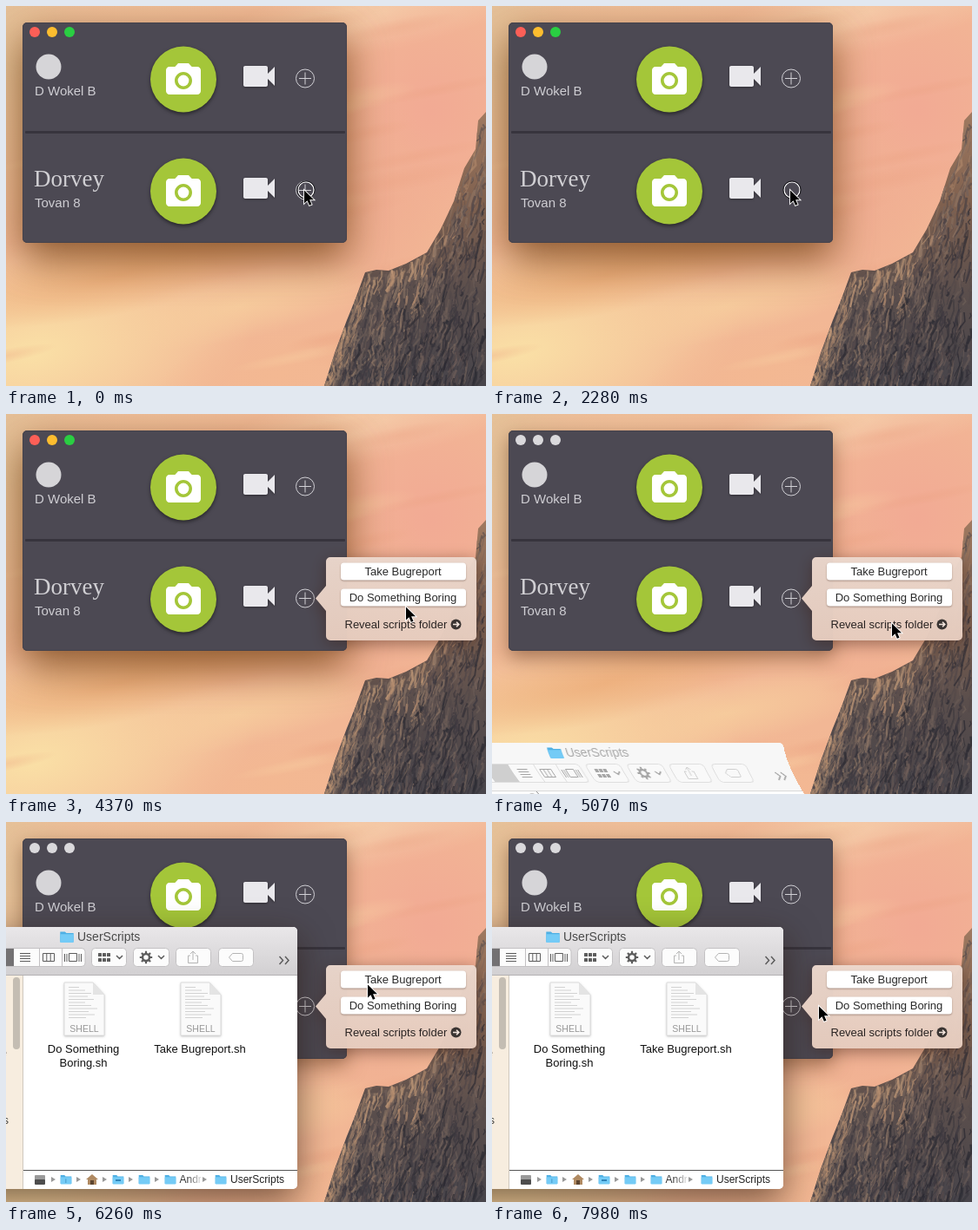
An HTML page with a canvas for the animation above (8 s loop, 552 by 438 pixels).

```html
<!DOCTYPE html>
<html lang="en">
<head>
<meta charset="utf-8">
<title>Device window and scripts folder</title>
<style>
html, body { margin: 0; width: 100%; height: 100%; overflow: hidden; }
canvas { display: block; }
</style>
</head>
<body>
<canvas id="stage" width="552" height="438"></canvas>
<script>
const stage = document.getElementById('stage').getContext('2d');
const LOOP = 8000, SANS = '"Liberation Sans", Arial, sans-serif';
let g = stage;

// ---- drawing helpers, all on the current context g ----
function layer(w, h, draw) {
  const c = document.createElement('canvas');
  c.width = w; c.height = h;
  const old = g;
  g = c.getContext('2d');
  draw();
  g = old;
  return c;
}
function box(x, y, w, h, r, fill, stroke) {
  g.beginPath();
  g.roundRect(x, y, w, h, r);
  if (fill) { g.fillStyle = fill; g.fill(); }
  if (stroke) { g.strokeStyle = stroke; g.lineWidth = 1; g.stroke(); }
}
function disc(x, y, r, fill) {
  g.beginPath();
  g.arc(x, y, r, 0, 7);
  g.fillStyle = fill;
  g.fill();
}
function ring(x, y, r, color, width = 1) {
  g.beginPath();
  g.arc(x, y, r, 0, 7);
  g.strokeStyle = color;
  g.lineWidth = width;
  g.stroke();
}
function stroke(d, color, width = 1) {
  g.strokeStyle = color;
  g.lineWidth = width;
  g.stroke(new Path2D(d));
}
function fill(d, color) {
  g.fillStyle = color;
  g.fill(new Path2D(d));
}
function text(s, x, y, size, color, align = 'left', family = SANS) {
  g.font = size + 'px ' + family;
  g.textAlign = align;
  g.fillStyle = color;
  g.fillText(s, x, y);
}
function shadow(color, blur, dy) {
  g.shadowColor = color;
  g.shadowBlur = blur;
  g.shadowOffsetY = dy;
}
const noShadow = () => shadow('transparent', 0, 0);
function at(x, y, draw, scale = 1) {
  g.save();
  g.translate(x, y);
  g.scale(scale, scale);
  draw();
  g.restore();
}
function vertical(y0, y1, ...colors) {
  const v = g.createLinearGradient(0, y0, 0, y1);
  colors.forEach((c, i) => v.addColorStop(i / (colors.length - 1), c));
  return v;
}
let seed = 7;
const rnd = () => (seed = seed * 16807 % 2147483647) / 2147483647;

// ---- wallpaper ----
const ridge = [[366, 438], [378, 400], [392, 362], [401, 340], [413, 307], [426, 304], [440, 305],
  [460, 297], [484, 284], [500, 257], [515, 225], [527, 187], [540, 165], [543, 132], [552, 122]];
function ridgeY(x) {
  const i = Math.max(1, ridge.findIndex(p => p[0] >= x));
  const [a, b] = [ridge[i - 1], ridge[i]];
  return a[1] + (b[1] - a[1]) * (x - a[0]) / (b[0] - a[0]);
}
function cloud(x, y, rx, ry, rgb, alpha = 1) {
  g.save();
  g.translate(x, y);
  g.rotate(-0.2);
  g.scale(rx, ry);
  const c = g.createRadialGradient(0, 0, 0, 0, 0, 1);
  c.addColorStop(0, `rgba(${rgb},${alpha})`);
  c.addColorStop(0.5, `rgba(${rgb},${alpha * 0.55})`);
  c.addColorStop(1, `rgba(${rgb},0)`);
  g.fillStyle = c;
  g.fillRect(-1, -1, 2, 2);
  g.restore();
}
function rock() {
  g.save();
  g.beginPath();
  ridge.forEach(([x, y]) => g.lineTo(x, y));
  g.lineTo(552, 438);
  g.clip();
  g.fillStyle = vertical(120, 438, '#a07a61', '#80614f', '#5a4e4c', '#47444a');
  g.fillRect(360, 110, 200, 330);
  const tones = ['#2b2a32', '#3c383f', '#54494a', '#73625b', '#8f7766', '#b48c6e', '#c99f7b'];
  for (let i = 0; i < 1500; i++) {
    const x = 366 + rnd() * 186, top = ridgeY(x);
    const depth = rnd() * (445 - top), len = 5 + rnd() * 22;
    const tone = rnd() * 4.4 + 2.6 * Math.exp(-depth / 40) - (x > 470 && depth > 90 ? 0.7 : 0);
    g.globalAlpha = 0.35 + rnd() * 0.4;
    g.beginPath();
    g.moveTo(x, top + depth);
    g.lineTo(x + (rnd() - 0.62) * 7, top + depth + len * 0.5);
    g.lineTo(x - len * (0.1 + rnd() * 0.3), top + depth + len);
    g.strokeStyle = tones[Math.min(6, Math.max(0, tone | 0))];
    g.lineWidth = 0.7 + rnd() * 2.2;
    g.stroke();
  }
  g.restore();
}
const wallpaper = layer(552, 438, () => {
  g.fillStyle = '#f2b795';
  g.fillRect(0, 0, 552, 438);
  cloud(0, 40, 190, 260, '227,194,152');
  cloud(180, 0, 220, 60, '238,190,152');
  cloud(430, 8, 190, 45, '245,207,170');
  cloud(490, 120, 150, 150, '242,170,148');
  cloud(425, 230, 90, 130, '240,174,146');
  cloud(30, 400, 260, 130, '250,224,166');
  cloud(130, 310, 220, 45, '236,172,120', 0.8);
  cloud(270, 345, 170, 40, '247,207,158', 0.8);
  cloud(310, 425, 140, 60, '243,184,146');
  for (let i = 0; i < 26; i++)
    cloud(rnd() * 500, rnd() * 438, 40 + rnd() * 70, 6 + rnd() * 12,
      i % 2 ? '250,214,166' : '234,160,128', 0.3);
  rock();
});

// ---- device window ----
const CAMERA = 'M9 2L7.17 4H4c-1.1 0-2 .9-2 2v12c0 1.1.9 2 2 2h16c1.1 0 2-.9 2-2V6c0-1.1-.9-2-2-2h-3.17L15 2H9z' +
  'm3 15c-2.76 0-5-2.24-5-5s2.24-5 5-5 5 2.24 5 5-2.24 5-5 5z';
const VIDEO = 'M17 10.5V7c0-.55-.45-1-1-1H4c-.55 0-1 .45-1 1v10c0 .55.45 1 1 1h12c.55 0 1-.45 1-1v-3.5l4 4v-11l-4 4z';

function plus(y) {
  ring(344, y, 10.5, '#d2d1d6');
  stroke(`M337 ${y}h14M344 ${y - 7}v14`, '#d2d1d6');
}
function device(dy, name) {
  text(name, 33, dy + 103, 15, '#cfced3');
  shadow('rgba(0,0,0,.5)', 4, 2);
  disc(204, dy + 84.5, 38, '#a4c639');
  noShadow();
  at(180, dy + 62, () => { fill(CAMERA, '#fff'); disc(12, 12, 3.2, '#fff'); }, 2);
  shadow('rgba(0,0,0,.4)', 3, 1);
  at(267, dy + 57, () => fill(VIDEO, '#e9e8ec'), 2);
  noShadow();
}
const deviceWindow = active => layer(552, 438, () => {
  g.drawImage(wallpaper, 0, 0);
  shadow(active ? 'rgba(105,55,10,.75)' : 'rgba(90,50,20,.5)', active ? 46 : 22, active ? 18 : 8);
  box(19, 19, 373, 254, 5, '#4c4953');
  noShadow();
  box(19.5, 19.5, 372, 253, 5, null, '#45424b');
  box(22, 144, 368, 3, 1, '#37343d');
  ['#fc5f57', '#fdbd2f', '#2ace42'].forEach((c, i) =>
    disc(33 + 20 * i, 30, 6, active ? c : '#dad9dc'));
  disc(49, 70, 14.5, '#d6d5d8');
  device(0, 'D Wokel B');
  text('Dorvey', 32, 208, 27, '#d0cfd3', 'left', '"Liberation Serif", Times, serif');
  device(129, 'Tovan 8');
  plus(83.5);
});
const front = deviceWindow(true), back = deviceWindow(false);

// ---- popover ----
function pushButton(y, label) {
  shadow('rgba(80,50,40,.45)', 2, 1);
  box(385, y, 144, 20, 3.5, '#fff');
  noShadow();
  text(label, 456.5, y + 14.5, 13, '#2a2a2a', 'center');
}
function popover(scale, alpha) {
  g.save();
  g.globalAlpha = alpha;
  g.translate(356, 212);
  g.scale(scale, scale);
  g.translate(-356, -212);
  shadow('rgba(60,30,20,.5)', 18, 4);
  fill('M373 165H536a5 5 0 0 1 5 5V256a5 5 0 0 1-5 5H373a5 5 0 0 1-5-5V227L356 212.5 368 198V170a5 5 0 0 1 5-5z',
    vertical(165, 261, 'rgba(237,217,206,.96)', 'rgba(233,207,193,.96)'));
  noShadow();
  pushButton(171.5, 'Take Bugreport');
  pushButton(201.5, 'Do Something Boring');
  text('Reveal scripts folder', 389.5, 246.5, 13, '#2a2423');
  disc(517.5, 242.5, 6, '#3a3432');
  stroke('M514 242.5h6.5M518 239.7l2.8 2.8-2.8 2.8', '#f4e6de', 1.6);
  g.restore();
}

// ---- file window, drawn with spare room on the left for the warp ----
const PAD = 150, TOP = 121, RIGHT = 335, HEIGHT = 302;

function folder(x, y, s = 1) {
  at(x, y, () => {
    fill('M-7 -5.5h5l1.5 1.5h7.5v9.5h-14z', '#4fb0e4');
    box(-7, -3, 14, 9, 1, '#74cbf6');
  }, s);
}
function page(x, label) {
  shadow('rgba(0,0,0,.3)', 3, 1);
  fill(`M${x - 23} 185h33l13 14v47h-46z`, '#fafafa');
  noShadow();
  stroke(`M${x - 23} 185h33l13 14v47h-46z`, '#dcdcdc');
  fill(`M${x + 10} 185v14h13z`, '#e4e4e4');
  for (let i = 0; i < 11; i++)
    stroke(`M${x - 18} ${190.5 + 3.5 * i}h${(i < 3 ? 12 : 18) + i * 7 % 17}`, '#d2d2d2');
  text('SHELL', x, 242, 10.5, '#999', 'center');
  label.forEach((s, i) => text(s, x - 1, 266 + 16 * i, 13, '#111', 'center'));
}
function toolbar(on) {
  const ink = on ? '#5c5c5c' : '#a6a6a6', soft = on ? '#b4b4b4' : '#cfcfcf', edge = on ? '#c3c1c3' : '#dedede';
  const face = on ? '#fcfcfc' : '#f9f9f9';
  folder(70, 132.5, 1.1);
  text('UserScripts', 82, 137, 14, on ? '#4a4a4a' : '#a9a9a9');
  box(-60, 145.5, 151, 21, 4, face, edge);
  fill('M-20 146h29v20h-29z', on ? '#737173' : '#cfcfcf');
  stroke('M38.5 146v20M64.5 146v20', edge);
  [[98, 40], [146, 41], [195, 40], [244, 40]].forEach(([x, w]) => box(x + 0.5, 145.5, w, 21, 4, face, edge));
  stroke('M16 151.5h12M16 154.5h12M16 157.5h12M16 160.5h12', ink);
  stroke('M42.5 151.5h13v9h-13zM46.8 151v9M51.2 151v9', ink);
  stroke('M72.5 151.5h9v9h-9zM67.5 152v9M70 152v9M84 152v9M86.5 152v9', ink);
  for (let i = 0; i < 6; i++) box(106 + i % 3 * 5, 151 + (i / 3 | 0) * 6, 4, 4, 0.5, ink);
  stroke('M127 154l3.5 3.5 3.5-3.5M175 154l3.5 3.5 3.5-3.5', ink, 1.5);
  ring(161, 156, 4, ink, 2.5);
  for (let i = 0; i < 8; i++)
    at(161, 156, () => { g.rotate(i * Math.PI / 4); box(-1.1, -7.2, 2.2, 3, 0, ink); });
  stroke('M212 154h-2.5v8.500h11v-8.500H218M215 159v-9.500M212 152l3-3 3 3', soft);
  stroke('M260.500 151.500h10q2 0 2 2v5q0 2-2 2h-10l-4-4.500z', soft);
  stroke('M314.500 155l4 4.500-4 4.500M321 155l4 4.500-4 4.500', ink, 1.5);
}
function sidebar(on) {
  box(-PAD, 177, PAD + 19, 247, 0, on ? '#f7eddf' : '#fdfdfd');
  const items = [['All My Files', 218], ['Cloud Drive', 270], ['Toolbox', 297], ['Mix', 322],
    ['Applications', 348], ['Desktop', 374], ['Documents', 400], ['Downloads', 425]];
  for (const [s, y] of items) text(s, -67, y, 13, '#444');
  stroke('M-81.500 388.500h7l3 3v11h-10z', '#777');
  disc(-77, 421, 7.5, '#777');
  stroke('M-77 417v6M-80 421l3 3 3-3', '#fff', 1.5);
  box(8, 179, 8, 83, 4, on ? '#c4bdb3' : '#c4c4c4');
  stroke('M19.500 177v247', on ? '#cfc8be' : '#8a8a8a');
}
function pathBar() {
  stroke('M20 401.500h315', '#555');
  box(33, 407, 12, 6, 1, '#9a9a9a');
  box(33, 412, 12, 6, 1, '#4d4d4d');
  [69, 129, 159, 189, 247].forEach(x => folder(x, 412, 0.9));
  text('i', 69, 416, 8, '#2f84b8', 'center');
  stroke('M126 413h6', '#2f84b8', 2);
  fill('M92 412l7-6 7 6h-2v6h-10v-6z', '#b08a62');
  box(97, 413, 4, 5, 0, '#5d4630');
  [54, 83, 113, 143, 173, 228].forEach(x => fill(`M${x - 2} 409l5 3-5 3z`, '#999'));
  const fade = g.createLinearGradient(208, 0, 224, 0);
  fade.addColorStop(0, '#333');
  fade.addColorStop(1, '#ddd');
  text('Andr', 199.5, 416, 12, fade);
  text('UserScripts', 258, 416, 12, '#222');
}
const fileWindow = on => layer(PAD + RIGHT, HEIGHT, () => {
  g.translate(PAD, -TOP);
  box(-PAD, TOP, PAD + RIGHT, HEIGHT, 5);
  g.clip();
  g.fillStyle = '#fff';
  g.fill();
  box(-PAD, TOP, PAD + RIGHT, 55, 0, on ? vertical(TOP, 176, '#e9e7e9', '#d2d0d2') : '#f7f7f7');
  stroke(`M${-PAD} 176.500H335`, on ? '#b3b1b3' : '#d8d8d8');
  toolbar(on);
  sidebar(on);
  page(90, ['Do Something', 'Boring.sh']);
  page(224, ['Take Bugreport.sh']);
  pathBar();
});
const filesActive = fileWindow(true), filesIdle = fileWindow(false);

// Rows are pulled towards a far point at the lower right.
function genie(t) {
  const pull = 0.0845 * ((5450 - t) / 210) ** 2.5;
  const drop = Math.round(Math.max(0, 5200 - t) * 2);
  const w = PAD + RIGHT;
  for (let y = 0; y < HEIGHT; y++) {
    const f = pull * (y / HEIGHT) ** 1.5;
    g.drawImage(filesIdle, 0, y, w, 1, 1104 * f - PAD * (1 - f), TOP + drop + y, w * (1 - f), 1);
  }
}
function files(t) {
  if (t < 5070) return;
  if (t < 5450) return genie(t);
  shadow('rgba(40,20,10,.6)', 40, 14);
  box(-PAD, TOP, PAD + RIGHT, HEIGHT, 5, '#fff');
  noShadow();
  g.drawImage(filesActive, -PAD, TOP);
}

// ---- pointer: time, x, y ----
const track = [[0, 343, 212], [660, 343, 212], [860, 385, 176], [1040, 422, 190], [1220, 398, 222],
  [1420, 352, 200], [1510, 352, 200], [1680, 330, 177], [1840, 316, 204], [2000, 334, 228],
  [2140, 360, 222], [2250, 343, 212], [3290, 343, 212], [3480, 385, 180], [3640, 428, 177],
  [3800, 460, 200], [3970, 463, 227], [4160, 463, 227], [4370, 460, 222], [4600, 460, 241],
  [5560, 460, 241], [5730, 452, 285], [5860, 425, 299], [6000, 393, 268], [6120, 390, 225],
  [6260, 416, 187], [6380, 422, 182], [6410, 422, 182], [6490, 428, 178], [6700, 428, 178],
  [6860, 375, 205], [7000, 275, 222], [7120, 228, 225], [7270, 229, 225], [7440, 300, 219],
  [7570, 400, 213], [7680, 435, 212], [7880, 435, 212], [7975, 376, 212], [8000, 376, 212]];
function pointer(t) {
  const i = track.findIndex(k => k[0] > t);
  const [b, c] = [track[i - 1], track[i]];
  const a = track[i - 2] || b, d = track[i + 1] || c;
  const u = (t - b[0]) / (c[0] - b[0]);
  const mix = n => Math.abs(c[1] - b[1]) + Math.abs(c[2] - b[2]) < 2 ? b[n] :
    b[n] + u * ((c[n] - a[n]) / 2 + u * (a[n] - 2.5 * b[n] + 2 * c[n] - d[n] / 2 +
    u * (1.5 * (b[n] - c[n]) + (d[n] - a[n]) / 2)));
  return [mix(1), mix(2)];
}
const ARROW = 'M0 .5V15.500L3.500 12.200 5.900 17.800 8.500 16.700 6.100 11.300H11z';
function cursor(t) {
  const [x, y] = pointer(t).map(Math.round);
  const clicked = t < 50 || t >= 2270 && t < 2340 || t >= 4700 && t < 4800;
  if (clicked) {
    ring(x + 2, y, 9, '#fff', 1.2);
    ring(x + 2, y, 10.2, '#17161a', 1);
  }
  at(x, y, () => { stroke(ARROW, '#fff', 1.8); fill(ARROW, '#000'); });
}

function frame(now) {
  const t = now % LOOP;
  g.drawImage(t < 4840 ? front : back, 0, 0);
  if (t < 2270 || t >= 2340) plus(212.5);
  files(t);
  const p = Math.min(1, (t - 2380) / 340);
  if (p > 0) {
    const scale = p < 0.5 ? 0.5 + 0.56 * Math.sin(p * Math.PI) : 1.03 - 0.03 * Math.cos((p * 2 - 2) * Math.PI + Math.PI * 2 * 0) + 0.06 * (1 - p) * 2 * (1 - p) * 2;
    popover(p < 1 ? (p < 0.5 ? scale : 1 + 0.06 * (2 - 2 * p) ** 2) : 1, Math.min(1, p * 3));
  }
  cursor(t);
}
const start = performance.now();
function tick() {
  frame(performance.now() - start);
  requestAnimationFrame(tick);
}
tick();
</script>
</body>
</html>
```
